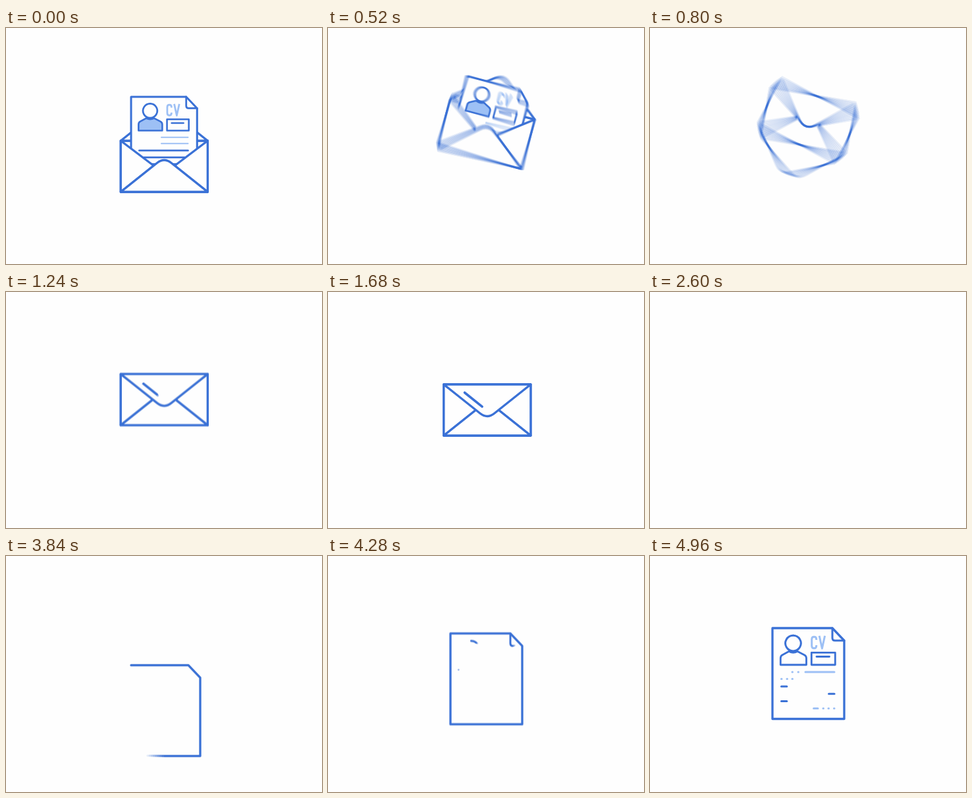
An HTML page with a canvas for the animation above (5 s loop, 480 px wide and 360 px high).

```html
<!DOCTYPE html>
<html lang="en">
<head>
<meta charset="utf-8">
<title>CV by mail</title>
<style>
  html, body { margin: 0; width: 100%; height: 100%; overflow: hidden; background: #fefefe; }
  canvas { display: block; width: 480px; height: 360px; }
</style>
</head>
<body>
<canvas id="stage" width="480" height="360" role="img" aria-label="A CV is drawn, put in an envelope and sent"></canvas>
<script>
const LOOP = 5000, STEP = 40, SHUTTER = 20, SAMPLES = 9;
const BLUE = '#3a71d6', LIGHT = '#9dc0f5', WHITE = '#fefefe';

const stage = document.getElementById('stage').getContext('2d');
const layer = document.createElement('canvas');
layer.width = 480;
layer.height = 360;
const c = layer.getContext('2d');

const unit = (t, a, b) => Math.min(1, Math.max(0, (t - a) / (b - a)));
const sine = (t, a, b) => 0.5 - 0.5 * Math.cos(Math.PI * unit(t, a, b));
const inOut = (t, a, b, n) => {
  const u = unit(t, a, b);
  return u < 0.5 ? (2 * u) ** n / 2 : 1 - (2 - 2 * u) ** n / 2;
};

// Eased value from a table of [time, value] stops.
function along(stops, t) {
  let v = stops[0][1];
  for (let i = 1; i < stops.length; i++) {
    v += (stops[i][1] - stops[i - 1][1]) * sine(t, stops[i - 1][0], stops[i][0]);
  }
  return v;
}

const mailX = [[1650, 240.3], [1954, 306.3], [2170, 154.3], [2620, 554.3]];
const mailY = [[30, 211], [280, 218], [640, 141], [922, 141], [1490, 180]];

function ink(path, { color = BLUE, width = 3.3, fill, cap = 'round' } = {}) {
  if (fill) {
    c.fillStyle = fill;
    c.fill(path);
  }
  c.strokeStyle = color;
  c.lineWidth = width;
  c.lineCap = cap;
  c.lineJoin = 'round';
  c.stroke(path);
}

// Strokes the first part p of a path of the given length.
function trim(d, length, p, style) {
  if (p <= 0) return;
  if (p < 1) c.setLineDash([length * p, length * 2]);
  ink(new Path2D(d), style);
  c.setLineDash([]);
}

function line(x1, y1, x2, y2, style) {
  ink(new Path2D(`M${x1} ${y1}L${x2} ${y2}`), style);
}

// Rows of writing: y, start time, from the right, light, segments.
const FULL = [[199.5, 280]];
const ROWS = [
  [177, 4625, true, true, [[236, 280], [225, 225.5], [216, 216.5], [208, 208.5], [199.5, 200]]],
  [187.5, 4868, false, true, [[199.5, 200], [208, 208.5], [216, 216.5], [225, 225.5], [236, 280]]],
  [199, 4918, false, false, FULL],
  [210.3, 4918, true, false, FULL],
  [221.5, 4918, false, false, FULL],
  [232.5, 4803, true, true, [[279.5, 280], [271, 271.5], [263, 263.5], [199.5, 255]]]
];

function writing(t, mailed) {
  for (const [y, start, fromRight, light, parts] of ROWS) {
    const reach = mailed ? 82 : (t - start) * 0.2;
    if (reach <= 0) continue;
    const lo = fromRight ? 280 - reach : 199.5;
    const hi = fromRight ? 280 : 199.5 + reach;
    for (const [a, b] of parts) {
      if (mailed && light && b - a < 1) continue;
      const x1 = Math.max(a, lo), x2 = Math.min(b, hi);
      if (x2 > x1) {
        line(x1, y, x2, y, { color: light ? LIGHT : BLUE, width: light && mailed ? 2.2 : 3 });
      }
    }
  }
}

const SHEET = 'M190 110H277L295 129V248.5H186V110H190';
const FOLD = 'M277 110V125Q277 129 281 129H295';
const HEAD = 'M217.5 121.3A11.8 11.8 0 1 1 217.4 121.3';
const BODY = 'M198.3 166V156Q198.3 152.5 201 151L211 145.5Q217.5 149 224 145.5L234.5 151Q237.5 152.5 237.5 156V166Z';
const FRAME = 'M245.3 147.3H281.3V166H245.3Z';
const LETTERS = 'M252.7 128V127Q252.7 123.2 249.2 123.2T245.7 127V137Q245.7 140.8 249.2 140.8T252.7 137V136M257.2 121.8L261.4 141L265.6 121.8';

function page(t, mailed) {
  const p = (a, b) => mailed ? 1 : sine(t, a, b);
  if (mailed) {
    c.fillStyle = WHITE;
    c.fill(new Path2D(SHEET));
  }
  trim(SHEET, 484, mailed ? 1 : inOut(t, 3340, 4260, 3));
  trim(FOLD, 36, p(4120, 4400), { width: 3 });
  trim(HEAD, 75, p(4200, 4560), { width: 3 });
  trim(BODY, 112, p(4280, 4680), { width: 2.8, fill: mailed ? LIGHT : undefined });
  trim(FRAME, 110, p(4360, 4720), { width: 2.8 });
  trim('M253 153.5H272.5', 20, p(4600, 4800), { width: 2.8 });
  c.globalAlpha = p(4360, 4640);
  ink(new Path2D(LETTERS), { color: LIGHT, width: 3, cap: 'butt' });
  c.globalAlpha = 1;
  writing(t, mailed);
}

// Top flap hinged on the upper edge; s runs from -1 (open) to 1 (shut).
function flap(s) {
  const y = h => -39 + s * h;
  ink(new Path2D(`M-66 -39L-11 ${y(44)}Q0 ${y(53)} 11 ${y(44)}L66 -39Z`), { fill: WHITE });
}

function envelope(t) {
  c.save();
  c.translate(along(mailX, t), along(mailY, t));
  c.rotate(2 * Math.PI * inOut(t, 415, 1145, 2));

  const shut = -1 + 2 * sine(t, 890, 1110);
  ink(new Path2D('M-66 -39H66V39H-66Z'), { fill: WHITE });
  if (shut < 0) flap(shut);

  if (t < 720) {
    c.save();
    c.beginPath();
    c.rect(-200, -300, 400, 339);
    c.clip();
    c.translate(-50.3, -106 + 85 * sine(t, 400, 700));
    c.scale(0.92, 0.92);
    c.translate(-186, -110);
    page(t, true);
    c.restore();
  }

  for (const side of [-1, 1]) {
    ink(new Path2D(`M${66 * side} 39V-39L${16 * side} -1Z`), { fill: WHITE });
  }
  ink(new Path2D('M-66 39L-11 -5Q0 -14 11 -5L66 39Z'), { fill: WHITE });
  if (shut >= 0) flap(shut);

  const glint = sine(t, 1100, 1300);
  if (glint > 0) {
    const dx = 13.3 * glint, dy = 10.7 * glint;
    line(-21 - dx, -15.8 - dy, -21 + dx, -15.8 + dy, { width: 3.6 });
  }
  c.restore();
}

function scene(t) {
  c.fillStyle = WHITE;
  c.fillRect(0, 0, 480, 360);
  if (t < 2600) envelope(t);
  if (t > 3340) {
    c.save();
    c.translate(0, 59 * (1 - sine(t, 3750, 4450)));
    page(t, false);
    c.restore();
  }
}

// Averages several moments of the shutter time where the motion is blurred.
function show(t) {
  const blurred = (t > 280 && t < 1300) || (t > 3380 && t < 4400);
  const n = blurred ? SAMPLES : 1;
  for (let i = 0; i < n; i++) {
    scene(blurred ? t + SHUTTER * (i / (n - 1) - 0.5) : t);
    stage.globalAlpha = 1 / (i + 1);
    stage.drawImage(layer, 0, 0);
  }
}

const begin = performance.now();
let shown = -1;
function tick() {
  const t = Math.floor((performance.now() - begin) % LOOP / STEP) * STEP;
  if (t !== shown) show(shown = t);
  requestAnimationFrame(tick);
}
tick();
</script>
</body>
</html>
```
